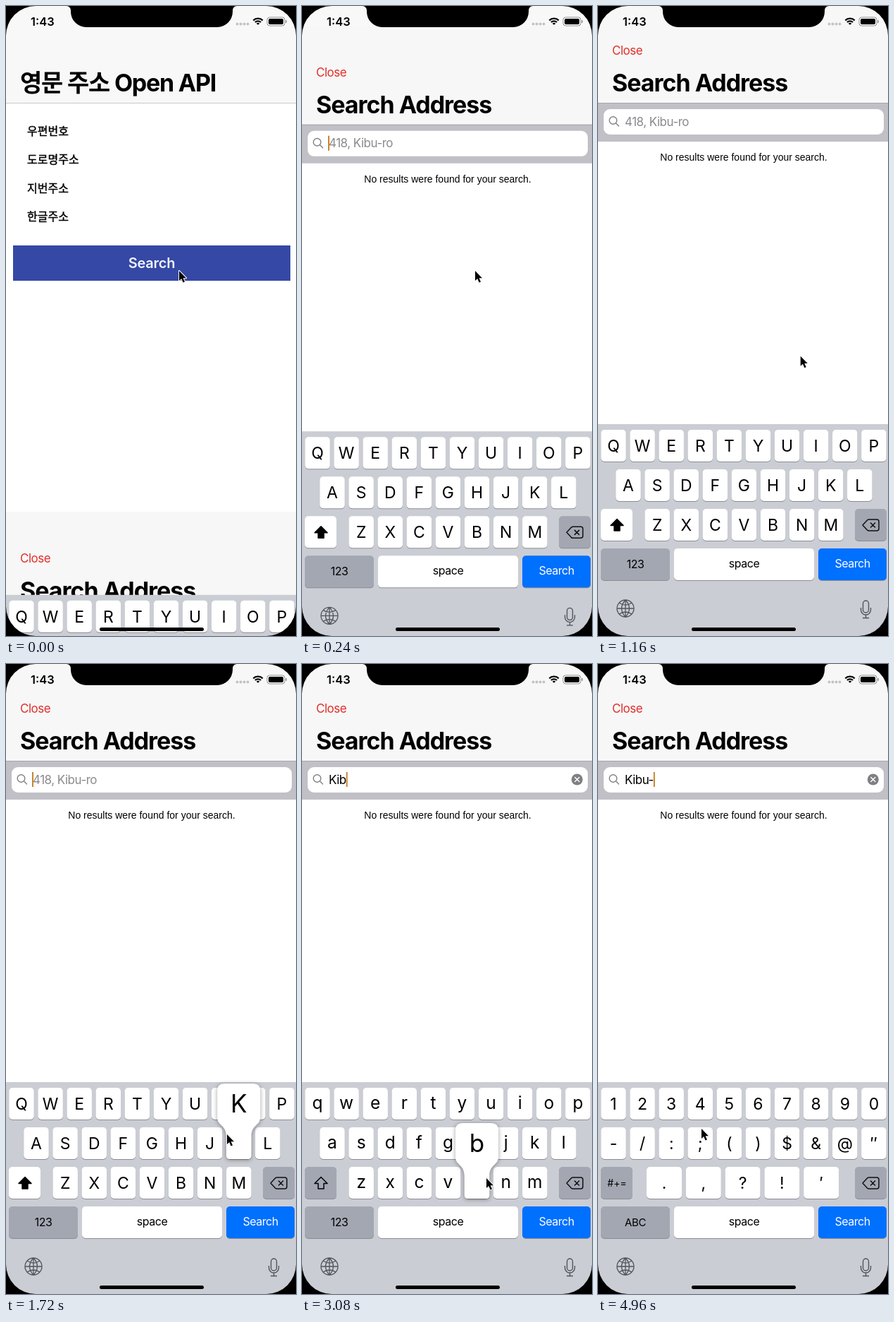
These frames come from a looping animation (412 px wide and 892 px high, 5000 ms). An HTML page with a canvas:

```html
<!DOCTYPE html>
<html lang="ko">
<head>
<meta charset="utf-8">
<title>Search Address</title>
<style>
html, body { margin: 0; height: 100%; overflow: hidden; background: #000; }
canvas { display: block; width: 412px; height: 892px; }
</style>
</head>
<body>
<canvas id="stage"></canvas>
<script>
const W = 412, H = 892, LOOP = 5000, STEP = 40;
const canvas = document.getElementById('stage');
const dpr = window.devicePixelRatio || 1;
canvas.width = W * dpr;
canvas.height = H * dpr;
const c = canvas.getContext('2d');
c.scale(dpr, dpr);

const SANS = 'Inter, "Noto Sans CJK KR", "Noto Sans CJK", sans-serif';
const PLACEHOLDER = '418, Kibu-ro';
const SYMBOLS_AT = 4000;
const PITCH = 41.1;

// key centre x, key top y, press, insert and release times
const PRESSES = [
  { ch: 'K', x: 330.7, y: 656, down: 1600, typed: 1760, up: 1800 },
  { ch: 'i', x: 309.7, y: 600, down: 2080, typed: 2160, up: 2200 },
  { ch: 'b', x: 248.5, y: 712, down: 2960, typed: 3060, up: 3120 },
  { ch: 'u', x: 268.6, y: 600, down: 3440, typed: 3520, up: 3560 },
  { ch: '-', x: 22, y: 656, down: 4680, typed: 4760, up: 4800 }
];

// time, x, y
const POINTER = [
  [340, 246, 375], [600, 248, 247], [720, 249, 245], [1500, 314, 666], [1820, 314, 666],
  [2060, 309, 626], [2200, 309, 628], [2760, 262, 728], [3140, 262, 728], [3420, 268, 630],
  [3580, 268, 630], [3900, 48, 790], [4520, 48, 790], [4680, 24, 682], [4820, 24, 682],
  [4960, 147, 658]
];

function text(s, x, y, size, color = '#000', align = 'left', weight = 400, family = SANS, spacing = -0.03) {
  c.font = `${weight} ${size}px ${family}`;
  c.letterSpacing = spacing * size + 'px';
  c.textAlign = align;
  c.fillStyle = color;
  c.fillText(s, x, y);
}

function rect(x, y, w, h, color, radius = 0) {
  c.fillStyle = color;
  c.beginPath();
  c.roundRect(x, y, w, h, radius);
  c.fill();
}

function dot(x, y, r, color) {
  c.fillStyle = color;
  c.beginPath();
  c.arc(x, y, r, 0, 7);
  c.fill();
}

function stroke(d, color, width) {
  c.strokeStyle = color;
  c.lineWidth = width;
  c.stroke(new Path2D(d));
}

function fill(d, color) {
  c.fillStyle = color;
  c.fill(new Path2D(d));
}

function shifted(dx, dy, draw) {
  c.save();
  c.translate(dx, dy);
  draw();
  c.restore();
}

// critically damped spring, already under way when the loop starts
function springLeft(t) {
  const u = 0.8075 + 18.26 * t / 1000;
  return (1 + u) * Math.exp(-u);
}

function pointerAt(t) {
  const i = POINTER.findIndex(p => p[0] > t);
  if (i < 0) return POINTER[POINTER.length - 1].slice(1);
  if (i === 0) return POINTER[0].slice(1);
  const [t0, x0, y0] = POINTER[i - 1], [t1, x1, y1] = POINTER[i];
  const p = (t - t0) / (t1 - t0), e = p * p * (3 - 2 * p);
  return [x0 + (x1 - x0) * e, y0 + (y1 - y0) * e];
}

function drawPage() {
  rect(0, 0, W, H, '#fff');
  rect(0, 0, W, 137, '#f8f8f8');
  rect(0, 137, W, 1, '#c9c9cc');
  text('영문 주소 Open API', 20, 121, 34, '#000', 'left', 700, SANS, -0.036);
  // a hairline outline turns the regular weight into a medium one
  c.strokeStyle = '#000';
  c.lineWidth = 0.4;
  ['우편번호', '도로명주소', '지번주소', '한글주소'].forEach((label, i) => {
    const y = 182.5 + i * 40.5;
    text(label, 30, y, 16, '#000', 'left', 500, SANS, 0);
    c.strokeText(label, 30, y);
  });
  rect(10, 339, 394, 50, '#3548a5');
  text('Search', 207, 371, 20, '#f0f2fa', 'center', 600, SANS, -0.01);
}

function drawSheet(t, typed, blinkStart) {
  rect(0, -3, W, H + 3, '#fff');
  rect(0, -3, W, 140, '#f7f7f7');
  text('Close', 20, 69, 17, '#e0302b');
  text('Search Address', 20, 121, 34, '#000', 'left', 700);

  rect(0, 137, W, 55, '#c0c0c6');
  rect(0, 137, W, 1, '#a6a6ab');
  rect(8, 146, 398, 36, '#fff', 9);
  c.lineCap = 'round';
  stroke('M26.8 162a5.3 5.3 0 1 1-10.6 0a5.3 5.3 0 1 1 10.6 0M25.5 166l4 4', '#808085', 1.4);
  text(typed || PLACEHOLDER, 38, 169.5, 17, typed ? '#000' : '#8a8a8e');
  const caretX = typed ? 38 + c.measureText(typed).width : 37;
  if ((t - blinkStart) % 1000 < 500) rect(caretX, 153, 2, 21, '#c98429');
  if (typed) {
    dot(390.8, 163.5, 8, '#7f7f84');
    stroke('M387.8 160.5l6 6m0-6l-6 6', '#fff', 1.5);
  }
  text('No results were found for your search.', 207, 219, 14, '#000', 'center', 400,
    '"Liberation Sans", Arial, sans-serif', 0);
}

function key(x, y, w, color = '#fff') {
  rect(x, y + 1, w, 45, '#8b8d93', 5);
  rect(x, y, w, 45, color, 5);
}

function keyRow(chars, firstX, y, pitch, w, lower) {
  [...chars].forEach((ch, i) => {
    const x = firstX + i * pitch;
    key(x - w / 2, y, w);
    text(ch, x, y + (lower ? 29.5 : 31), lower ? 24.5 : 23, '#000', 'center', 400, SANS, 0);
  });
}

function drawKeyboard(t) {
  const GREY = '#a3a7b2';
  const symbols = t >= SYMBOLS_AT;
  const lower = !symbols && t >= PRESSES[0].typed;
  const label = s => lower ? s.toLowerCase() : s;
  rect(0, 592, W, 400, '#cbcdd4');
  keyRow(symbols ? '1234567890' : label('QWERTYUIOP'), 22, 600, PITCH, 35.5, lower);
  keyRow(symbols ? '-/:;()$&@″' : label('ASDFGHJKL'), symbols ? 22 : 43, 656, PITCH, 35.5, lower);
  if (symbols) keyRow('.,?!′', 94, 712, 55.8, 50, false);
  else keyRow(label('ZXCVBNM'), 84.2, 712, PITCH, 35.5, lower);

  key(4, 712, 45, symbols || lower ? GREY : '#fff');
  c.lineJoin = 'round';
  const arrow = 'M27 726.5l9 9h-5v7.5h-8v-7.5h-5z';
  if (symbols) text('#+=', 27, 740, 14, '#000', 'center', 400, SANS, 0);
  else {
    if (!lower) fill(arrow, '#000');
    stroke(arrow, '#000', 1.5);
  }

  key(365, 712, 45, GREY);
  stroke('M376 735l6.5-7q1-1 2.5-1H396q3 0 3 3v10q0 3-3 3h-11q-1.5 0-2.5-1zM387 731.5l7 7m0-7l-7 7', '#111', 1.5);

  key(4, 768, 98, GREY);
  text(symbols ? 'ABC' : '123', 53, 796, symbols ? 15 : 16, '#000', 'center');
  key(108, 768, 199);
  text('space', 207.5, 795, 16, '#000', 'center');
  key(313, 768, 97, '#0070ff');
  text('Search', 361.5, 795, 16, '#fff', 'center');

  stroke('M51 853a12 12 0 1 1-24 0a12 12 0 1 1 24 0M39 841v24M27 853h24M39 841q-11 12 0 24q11-12 0-24M30 845q9 6 18 0M30 861q9-6 18 0', '#50555c', 1.3);
  stroke('M384.5 846v9a4 4 0 0 1-8 0v-9a4 4 0 0 1 8 0zM373.5 852v3a7 7 0 0 0 14 0v-3M380.5 862v4M376 866.5h9', '#50555c', 1.4);
}

function drawBalloon({ ch, x, y }) {
  const l = Math.max(2, x - 30.5), r = l + 61, kl = x - 17.8, kr = x + 17.8;
  c.save();
  c.shadowColor = 'rgba(0,0,0,.38)';
  c.shadowBlur = 6 * dpr;
  c.shadowOffsetY = dpr;
  fill(`M${l + 10} ${y - 62}H${r - 10}q10 0 10 10V${y - 14}
    C${r} ${y - 2} ${kr} ${y - 4} ${kr} ${y + 13}V${y + 40}q0 5-5 5H${kl + 5}q-5 0-5-5V${y + 13}
    C${kl} ${y - 4} ${l} ${y - 2} ${l} ${y - 14}V${y - 52}q0-10 10-10z`, '#fff');
  c.restore();
  text(ch, (l + r) / 2, y - 21, 35, '#000', 'center', 400, SANS, 0);
}

function drawDevice() {
  text('1:43', 35, 27.5, 16.5, '#000', 'left', 600, SANS, 0);
  for (let i = 0; i < 4; i++) dot(328.5 + i * 5, 25.5, 2, '#c4c4c6');

  c.lineCap = 'butt';
  c.strokeStyle = '#000';
  c.lineWidth = 2.3;
  [2, 5.7, 9.4].forEach(r => {
    c.beginPath();
    c.arc(358, 27, r, -Math.PI * 0.75, -Math.PI * 0.25);
    c.stroke();
  });
  c.strokeStyle = '#8c8c8e';
  c.lineWidth = 1;
  c.beginPath();
  c.roundRect(371, 16, 25, 12, 3.5);
  c.stroke();
  rect(373, 18, 21, 8, '#000', 2);
  rect(397.3, 20, 1.5, 4, '#8c8c8e', 1);

  fill('M86 0a6 6 0 0 1 6 6v2a22 22 0 0 0 22 22h186a22 22 0 0 0 22-22v-2a6 6 0 0 1 6-6z', '#000');
  rect(133, 880, 148, 5, '#000', 2.5);
  c.fillStyle = '#000';
  c.beginPath();
  c.rect(0, 0, W, H);
  c.roundRect(0, 0, W, H, 42);
  c.fill('evenodd');
}

function drawPointer(t) {
  const [x, y] = pointerAt(t);
  if (t >= SYMBOLS_AT && t < SYMBOLS_AT + 240) {
    const ring = 'M69.5 792a20.5 20.5 0 1 1-41 0a20.5 20.5 0 1 1 41 0';
    stroke(ring, '#fff', 5);
    stroke(ring, '#000', 3);
  }
  shifted(x, y, () => {
    const arrow = 'M0 0v14l3.2-3l2.4 5.4l2.4-1l-2.4-5.2h4.4z';
    c.lineJoin = 'round';
    stroke(arrow, '#fff', 2);
    fill(arrow, '#000');
  });
}

function draw(t) {
  const left = springLeft(t);
  const done = PRESSES.filter(p => t >= p.typed);
  const typed = done.map(p => p.ch).join('');
  const blinkStart = done.length ? done[done.length - 1].typed : -760;
  const active = PRESSES.find(p => t >= p.down && t < p.up);

  drawPage();
  shifted(0, H * left, () => drawSheet(t, typed, blinkStart));
  shifted(0, 300 * left, () => {
    drawKeyboard(t);
    if (active) drawBalloon(active);
  });
  drawDevice();
  drawPointer(t);
}

const start = performance.now();
function tick() {
  const elapsed = performance.now() - start + 2;
  draw(Math.floor(elapsed % LOOP / STEP) * STEP);
  requestAnimationFrame(tick);
}
tick();
</script>
</body>
</html>
```
